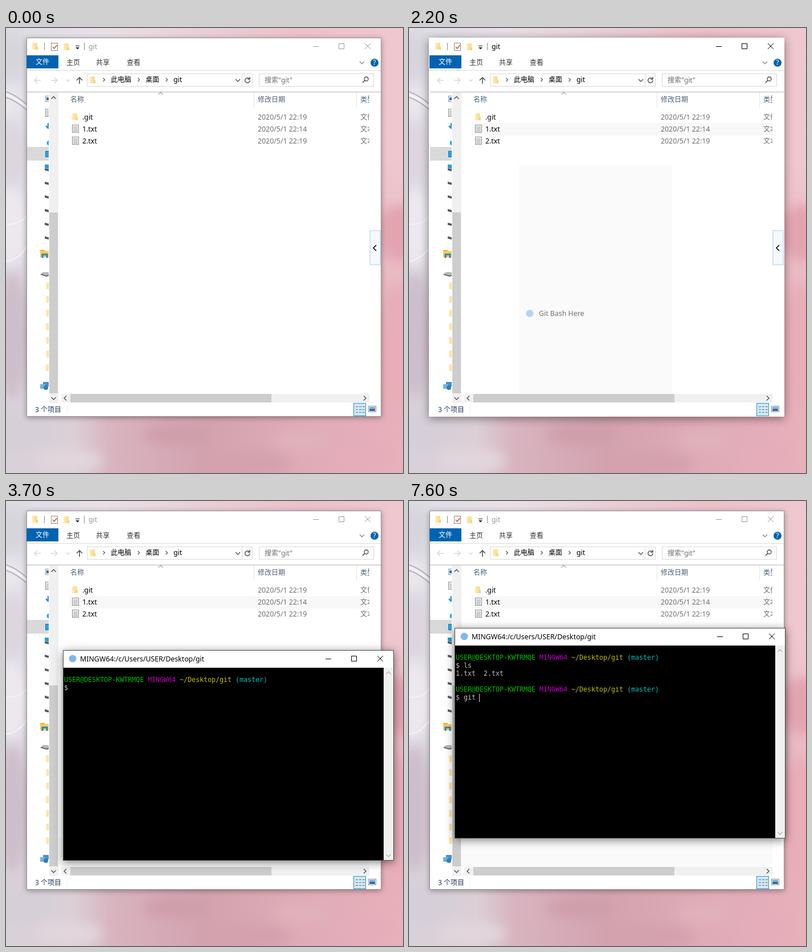
Write an HTML page that moves like this. It is 697x782 px and loops after 8 s.

```html
<!DOCTYPE html>
<html lang="zh">
<head>
<meta charset="utf-8">
<title>Git Bash Here</title>
<style>
html, body { margin: 0; width: 100%; height: 100%; overflow: hidden; }
svg { display: block; width: 697px; height: 782px; }
text { font: 12px "Noto Sans", "Noto Sans CJK SC", "Noto Sans CJK", sans-serif; white-space: pre; }
text.latin { font-size: 12.35px; }
text.mono { font: 11.63px "DejaVu Sans Mono", monospace; }
</style>
</head>
<body>
<svg id="stage" viewBox="0 0 697 782" xmlns="http://www.w3.org/2000/svg"></svg>
<script>
const LOOP = 8000, STEP = 100;

const rect = (x, y, w, h, fill, extra = '') =>
  `<rect x="${x}" y="${y}" width="${w}" height="${h}" fill="${fill}" ${extra}/>`;
const frame = (x, y, w, h, stroke, fill = 'none') =>
  rect(x + .5, y + .5, w - 1, h - 1, fill, `stroke="${stroke}"`);
const line = (d, stroke, width = 1, extra = '') =>
  `<path d="${d}" fill="none" stroke="${stroke}" stroke-width="${width}" ${extra}/>`;
const dot = (x, y, r, fill) => `<circle cx="${x}" cy="${y}" r="${r}" fill="${fill}"/>`;
// Baselines sit on whole pixels so that glyphs stay crisp.
const text = (x, cy, s, fill = '#000', extra = '') => {
  const cls = /^[\x00-\x7f]+$/.test(s) ? 'class="latin"' : '';
  return `<text x="${x}" y="${Math.round(cy + 4.2)}" fill="${fill}" ${cls} ${extra}>${s}</text>`;
};
const mono = (x, cy, s, fill = '#bfbfbf') =>
  `<text class="mono" x="${x}" y="${cy + 4}" fill="${fill}">${s}</text>`;

const turns = { down: 0, left: 90, up: 180, right: 270 };
const chevron = (x, y, dir, size = 4, color = '#505050', width = 1.4) =>
  `<path transform="translate(${x} ${y}) rotate(${turns[dir]})" fill="none" stroke="${color}"
    stroke-width="${width}" d="M${-size} ${-size / 2}L0 ${size / 2}L${size} ${-size / 2}"/>`;

const folder = (x, y) => rect(x - 5, y - 6, 9, 12, '#fae095') +
  rect(x - 5, y - 6, 3, 12, '#fdebb8') + rect(x + 2, y + 1, 3, 5, '#f3d27c');
const page = (x, y) => frame(x - 6, y - 7, 12, 14, '#8b8b8b', '#fafafa') +
  line([-4, -2, 0, 2, 4].map(d => `M${x - 4} ${y + d + .5}h8`).join(''), '#a5a5a5');
const gitMark = (x, y) => dot(x, y, 6.5, '#80b6ea');

const captionButtons = (x, y, color) =>
  line(`M${x} ${y + .5}h10M${x + 45.5} ${y - 4.5}h9v9h-9zM${x + 91} ${y - 5}l10 10m0 -10l-10 10`, color);

function backdrop() {
  const stops = (list) => list.map(([o, c]) => `<stop offset="${o}" stop-color="${c}"/>`).join('');
  const blob = (x, y, rx, ry, fill) => `<ellipse cx="${x}" cy="${y}" rx="${rx}" ry="${ry}" fill="${fill}"/>`;
  return `<defs>
    <linearGradient id="sky">${stops([[0, '#dddce3'], [.25, '#e8e0e6'], [.5, '#e8cfd6'], [.75, '#ebc0c9'], [1, '#efc8cf']])}</linearGradient>
    <linearGradient id="floor">${stops([[0, '#d8d1d9'], [.17, '#dccfd6'], [.26, '#d8b5c0'], [.5, '#d3a2af'], [.75, '#dfabb7'], [1, '#e8b0bb']])}</linearGradient>
    <linearGradient id="fade" x2="0" y2="1">${stops([[.3, '#000'], [.75, '#fff']])}</linearGradient>
    <mask id="low">${rect(0, 0, 697, 782, 'url(#fade)')}</mask>
    <filter id="soft" x="-50%" y="-50%" width="200%" height="200%"><feGaussianBlur stdDeviation="10"/></filter>
    </defs>` +
    rect(0, 0, 697, 782, 'url(#sky)') + rect(0, 0, 697, 782, 'url(#floor)', 'mask="url(#low)"') +
    `<g filter="url(#soft)">` +
    blob(8, 50, 34, 40, '#d6d5dc') + blob(4, 130, 30, 30, '#e9e6ec') + blob(5, 220, 34, 50, '#ded5de') +
    blob(8, 350, 32, 70, '#ece8ee') + blob(10, 540, 30, 110, '#cdbecb') + blob(30, 710, 60, 30, '#d6cfd8') +
    blob(110, 760, 60, 20, '#e2d6dd') + blob(690, 360, 40, 50, '#e3a4b0') + blob(690, 560, 40, 110, '#e8adb8') +
    blob(300, 715, 60, 18, '#cf9eab') + blob(420, 765, 80, 22, '#d4a0ae') + blob(520, 725, 50, 20, '#e0b0bb') +
    blob(630, 750, 50, 26, '#e4adb9') + '</g>' +
    line('M0 112Q18 118 36 134M0 122Q18 128 36 144', '#aaa5af', 1.5) +
    line('M0 117Q18 123 36 139', '#f5f3f6', 3) +
    line('M0 345Q24 346 36 330M0 410Q24 406 36 384', '#f5f2f6', 2);
}

function sidebar() {
  const drive = (x, y) => `<path d="M${x - 4} ${y - 3}l8 2v4l-8 -2z" fill="#555"/>` +
    line(`M${x - 4} ${y - 3}l8 2`, '#bbb');
  let s = rect(37, 209, 39, 24, '#d9d9d9') +
    frame(69, 119, 10, 11, '#8a9aa8', '#e9f3fa') + rect(71, 122, 6, 5, '#2e74b5') +
    page(75, 149) + line('M74 167v9m-4 -4l4 4l4 -4', '#2f8fdd', 2.5) +
    dot(76, 202, 4.5, '#28a8ea') + frame(69, 216, 12, 11, '#1573b8', '#22a5f1') +
    rect(68, 240, 7, 7, '#1ba1e2') + drive(72, 249);
  for (let y = 273; y <= 369; y += 24) s += drive(72, y);
  s += rect(60, 390, 8, 4, '#f0b429') + rect(60, 392, 15, 11, '#fdcb4d') + line('M64 404v-6h8v6', '#2586d0', 3) +
    '<path d="M60 433l5 -4h9l4 3v3l-7 2z" fill="#b7b7b7"/>' + line('M61 433l10 3l6 -2', '#555', 1.5);
  for (let y = 453; y <= 597; y += 24) s += folder(75, y);
  s += rect(65, 622, 10, 8, '#4a90c8') + rect(60, 626, 9, 8, '#6db4e4') + dot(70, 632, 4, '#2f7db8');
  return `<clipPath id="pane">${rect(37, 113, 38, 545, '#000')}</clipPath><g clip-path="url(#pane)">${s}</g>` +
    rect(76, 113, 16, 546, '#f0f0f0') + rect(76, 324, 15, 318, '#cdcdcd') +
    chevron(83.5, 122.5, 'up') + chevron(83.5, 651, 'down');
}

function explorer() {
  const pale = '#d6d6d6', grey = '#6d6d6d', head = '#4c607a';
  const row = (y, name, date, kind) => text(134, y, name) + text(442, y, date, grey) +
    text(622, y, kind, grey, 'clip-path="url(#cols)"');
  return `<clipPath id="cols">${rect(0, 0, 638, 782, '#000')}</clipPath>` +
    folder(51, 32) + folder(106, 33) + line('M67.5 26v13M137.5 26v13', '#8a8a8a') +
    frame(79, 26, 12, 14, '#8a8a8a', '#fff') + line('M82 33l2.5 3l5 -6', '#d9541e', 1.6) +
    line('M122 31.5h7', '#222') + '<path d="M122 34h7l-3.5 3.5z" fill="#222"/>' +
    rect(36, 48, 56, 23, '#0063b1') + text(52, 60, '文件', '#fff') +
    text(106, 60.5, '主页', '#333') + text(158, 60.5, '共享', '#333') + text(212, 60.5, '查看', '#333') +
    chevron(625, 61, 'down', 4, '#8a8a8a') + dot(647, 61, 7, '#0063b1') +
    text(647, 61, '?', '#fff', 'text-anchor="middle" font-weight="bold"') +
    line('M36 74.5h622', '#dadbdc') + line('M37 112.5h621', '#b5b5b5') +
    line('M61 92h-11m5 -5l-5 5l5 5M79 92h11m-5 -5l5 5l-5 5', pale, 1.4) + chevron(108.5, 92, 'down', 3, pale) +
    line('M129 98v-11m-5 5l5 -5l5 5', '#555', 1.6) +
    frame(142, 80, 291, 23, '#d9d9d9') + line('M414.5 80v23', '#d9d9d9') + folder(152, 91) +
    [172, 233, 282].map(x => chevron(x, 91, 'right', 3, '#555', 1.2)).join('') +
    text(184, 91, '此电脑') + text(245, 91, '桌面') + text(294, 90.5, 'git') +
    chevron(407, 92, 'down', 4) + line('M427 89a4.3 4.3 0 1 0 1.2 3M428 86v4h-4', '#555', 1.5) +
    frame(444, 80, 202, 23, '#d9d9d9') + text(454, 91.5, '搜索"git"', grey) +
    line('M626 96l4 -4', '#444', 1.6) + line('M629 89.5a3.5 3.5 0 1 1 7 0a3.5 3.5 0 1 1 -7 0', '#444', 1.3) +
    sidebar() + chevron(271.5, 115, 'up', 4, '#666', 1) +
    line('M435.5 113v27M615.5 113v27', '#e3e3e3') +
    text(113, 126, '名称', head) + text(442, 126, '修改日期', head) +
    text(622, 126, '类型', head, 'clip-path="url(#cols)"') +
    folder(121, 156) + page(122, 177) + page(122, 198) +
    row(156.5, '.git', '2020/5/1 22:19', '文件夹') + row(177.5, '1.txt', '2020/5/1 22:14', '文本文档') +
    row(198.5, '2.txt', '2020/5/1 22:19', '文本文档') +
    rect(639, 356, 18, 60, '#f5f9fd', 'stroke="#cfe4f6" stroke-width="2"') + chevron(647.5, 386.5, 'left', 5, '#000', 1.6) +
    rect(97, 643, 541, 15, '#f0f0f0') + rect(113, 643, 353, 15, '#cdcdcd') +
    chevron(104, 650.5, 'left') + chevron(630, 650.5, 'right') +
    text(51, 670.5, '3 个项目', '#1e395b') + line('M107.5 663v15', '#eee') +
    frame(610, 659, 22, 23, '#2a92d0', '#cce8f6') +
    [665.5, 670.5, 675.5].map(y => line(`M614 ${y}h4m2 0h4m2 0h4`, '#7d7068')).join('') +
    frame(636, 664, 14, 11, '#8a8a8a', '#fff') + rect(638, 666, 10, 7, '#6aa9dd') + rect(638, 670, 10, 3, '#2c5b8c');
}

const menuItems = [
  { label: '查看(V)', sub: true }, { label: '排序方式(O)', sub: true }, { label: '分组依据(P)', sub: true },
  { label: '刷新(E)' }, null, { label: '自定义文件夹(F)...' }, null,
  { label: '粘贴(P)', off: true }, { label: '粘贴快捷方式(S)', off: true },
  { label: '撤消 重命名(U)', keys: 'Ctrl+Z' }, { label: '在 Coral Drafter 中打开(V)' },
  { label: 'Git GUI Here', icon: gitMark }, { label: 'Git Bash Here', icon: gitMark }, null,
  { label: '授予访问权限(G)', sub: true },
  { label: 'SVN 检出(K)...', icon: (x, y) => rect(x - 4, y - 5, 9, 9, '#d4c52c') },
  { label: 'TortoiseSVN', sub: true, icon: (x, y) => dot(x, y, 6, '#e8c65a') }, null,
  { label: '新建(W)', sub: true }, null, { label: '属性(R)' }
];
let menuY = 257.5;
menuItems.forEach((item, i) => {
  if (!item) { menuY -= 8; menuItems[i] = { rule: menuY }; menuY += 15; return; }
  item.y = menuY;
  menuY += 23;
});

function menuItem(item, hovered) {
  if (item.rule) return line(`M204 ${item.rule}h242`, '#919191');
  const { label, y, sub, off, keys, icon } = item;
  return (hovered ? rect(196, y - 11.5, 258, 23, '#fff') : '') +
    text(228, y, label, off ? '#838383' : '#000') + (icon ? icon(212, y) : '') +
    (keys ? text(401, y, keys) : '') + (sub ? chevron(441.5, y - 1, 'right', 6, '#444', 1.1) : '');
}

function menu(t) {
  if (t < 1000 || t >= 2400) return '';
  if (t >= 2100) {
    const bash = menuItems.find(i => i.label === 'Git Bash Here');
    return `<g opacity="${.55 - (t - 2200) / 100 * .3}">${menuItem(bash)}</g>`;
  }
  const hover = t < 1300 ? '' : t < 1400 ? 'Git GUI Here' : t < 1600 ? '授予访问权限(G)' :
    t < 1700 ? '' : 'Git Bash Here';
  return `<g opacity="${t < 1100 ? .5 : 1}"><g style="filter:drop-shadow(2px 2px 1px rgba(0,0,0,.65))">` +
    frame(193, 241, 264, 413, '#a0a0a0', '#eee') + '</g>' +
    menuItems.map(i => menuItem(i, i.label && i.label === hover)).join('') + '</g>';
}

function explorerState(t) {
  const active = t >= 900 && t < 2500;
  const shadow = active ? '0 3px 8px rgba(0,0,0,.45)' : '0 2px 5px rgba(0,0,0,.35)';
  const body = active ? rect(35, 17, 624, 666, '#fff') : frame(36, 17, 623, 666, '#9b959a', '#fff');
  const ink = active ? '#000' : '#999';
  const row = t < 300 ? '' : rect(110, 167, 528, 22, t < 400 ? '#e5f3ff' : '#f8f8f8');
  const ghost = t < 2100 ? '' : t < 3700 ? rect(193, 241, 269, 401, '#fafafa') : rect(92, 592, 546, 50, '#fafafa');
  return `<g style="filter:drop-shadow(${shadow})">${body}</g>` + row + ghost +
    text(145, 32.5, 'git', ink) + captionButtons(539, 32, ink);
}

const path = [[3500, -162, 200], [3600, -30, 236], [3700, 100, 262], [3800, 98, 246], [3900, 86, 230], [4000, 80, 223]];
function place(t) {
  if (t <= path[0][0]) return path[0].slice(1);
  const i = path.findIndex(p => p[0] >= t);
  if (i < 0) return path[path.length - 1].slice(1);
  const [a, b] = [path[i - 1], path[i]], k = (t - a[0]) / (b[0] - a[0]);
  return [1, 2].map(n => a[n] + (b[n] - a[n]) * k);
}

const prompt = cy => [
  [0, 'USER@DESKTOP-KWTRMQE', '#00bf00'], [21, 'MINGW64', '#bf00bf'],
  [29, '~/Desktop/git', '#bfbf00'], [43, '(master)', '#00bfbf']
].map(([col, s, fill]) => mono(2 + col * 7, cy, s, fill)).join('');

const typed = (t, keys) => keys.filter(([at]) => t >= at).map(([, s]) => s).join('');

function candidates(t) {
  if (t < 5400 || t >= 5800) return '';
  const full = t >= 5500;
  return frame(16, 77, 355, 58, '#c3c8ce', '#fff') + text(26, 92, full ? "l's" : 'l', '#333') +
    line('M17 106.5h353', '#e4e7ea') +
    (full ? ['老师', '拉萨', '历史', '零食', '连锁'] : ['了', '来', '里', '啦', '老'])
      .map((w, i) => text(26 + i * 62, 120, `${i + 1}.${w}`, i ? '#333' : '#d03a2b')).join('');
}

function terminal(t) {
  if (t < 2500) return '';
  const [x, y] = place(t);
  const second = t >= 6500;
  const input = second ? typed(t, [[7200, 'g'], [7300, 'i'], [7500, 't'], [7600, ' ']]) : typed(t, [[5900, 'ls']]);
  const caret = (t >= 4000 && t < 4500) || (t >= 4900 && t < 6400) || (t >= 6500 && t < 6900) || t >= 7200;
  const row = second ? 122 : 66;
  return `<g transform="translate(${Math.round(x)} ${Math.round(y)})" opacity="${t < 2600 ? .6 : 1}">
    <g style="filter:drop-shadow(0 3px 8px rgba(0,0,0,.5))">${frame(0, 0, 581, 370, '#4d4d4d', '#fff')}</g>` +
    rect(1, 31, 562, 338, '#000') + rect(563, 31, 17, 338, '#f0f0f0') +
    chevron(571.5, 40, 'up', 4, '#b4b4b4') + chevron(571.5, 361, 'down', 4, '#b4b4b4') +
    gitMark(17, 15) + text(30, 15.5, 'MINGW64:/c/Users/USER/Desktop/git') + captionButtons(461, 15, '#000') +
    (t >= 2700 ? prompt(52) + mono(2, 66, '$') : '') +
    (t >= 6400 ? mono(16, 66, 'ls') + mono(2, 80, '1.txt  2.txt') : '') +
    (second ? prompt(108) + mono(2, 122, '$') : '') +
    (t < 6400 || second ? mono(16, row, input) : '') +
    (caret ? rect(16 + input.length * 7 - (input ? 1 : 2), row - 6, 1, 14, '#d8d8d8') : '') +
    candidates(t) + '</g>';
}

const stage = document.getElementById('stage');
stage.innerHTML = backdrop() + '<g id="base"></g>' + explorer() + '<g id="top"></g>';
const base = document.getElementById('base'), topLayer = document.getElementById('top');

let shown = -1;
const start = performance.now();
function draw() {
  const t = Math.floor((performance.now() - start) % LOOP / STEP) * STEP;
  if (t !== shown) {
    base.innerHTML = explorerState(t);
    topLayer.innerHTML = menu(t) + terminal(t);
    shown = t;
  }
  requestAnimationFrame(draw);
}
draw();
</script>
</body>
</html>
```
